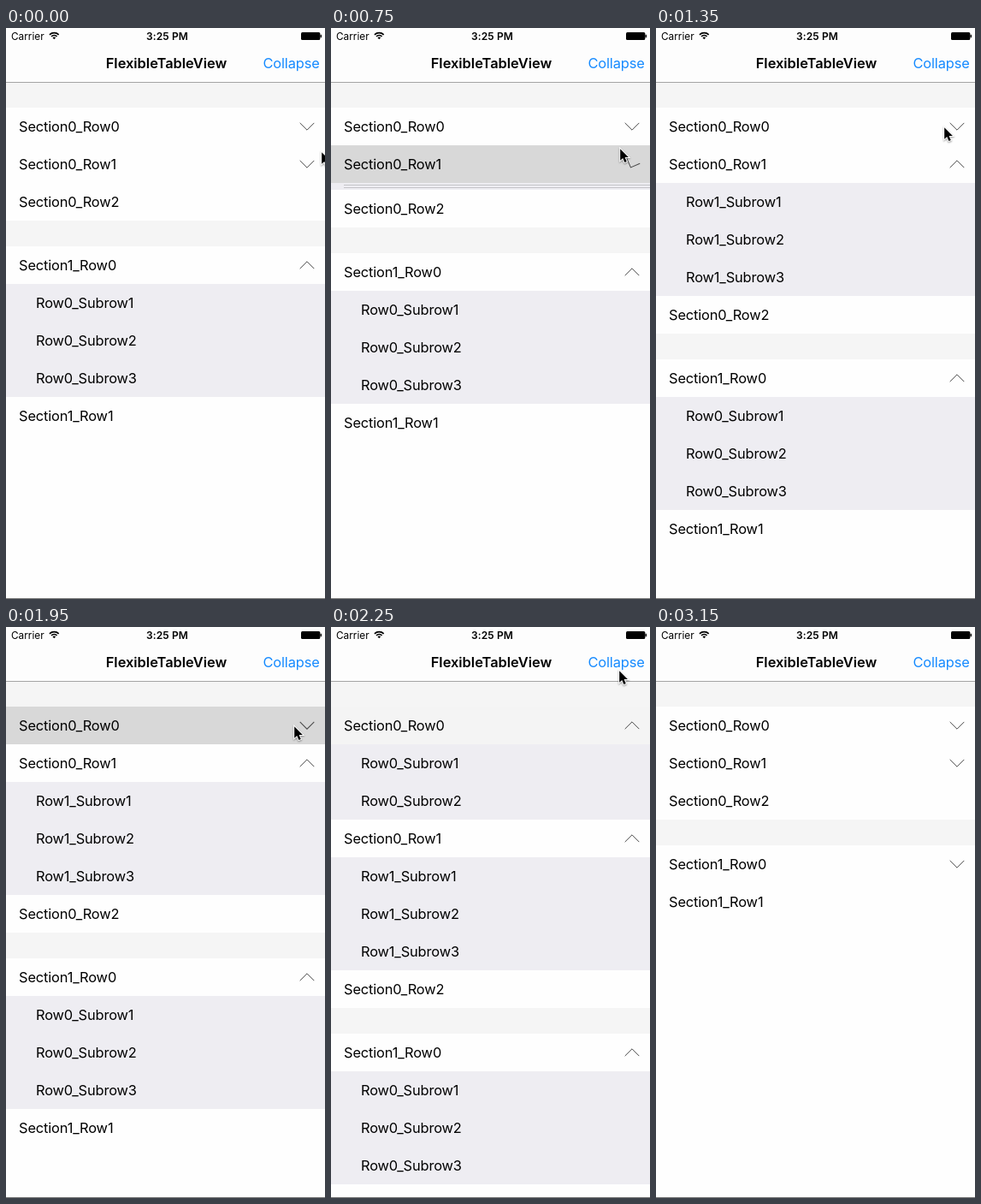
An HTML page with a canvas that plays this animation: 373x667 px, repeating every 4.5 s.

```html
<!DOCTYPE html>
<html lang="en">
<head>
<meta charset="utf-8">
<title>Expanding table</title>
<style>
  html, body { margin: 0; width: 100%; height: 100%; overflow: hidden; background: #fff; }
  canvas { display: block; width: 373px; height: 667px; }
</style>
</head>
<body>
<canvas id="stage"></canvas>
<script>
const W = 373, H = 667, ROW = 44, LOOP = 4500, TICK = 150;
const canvas = document.getElementById('stage');
const c = canvas.getContext('2d');
const dpr = window.devicePixelRatio || 1;
canvas.width = W * dpr;
canvas.height = H * dpr;

// openAt / turnAt: when the subrows and the chevron start to move (-1000 = already open)
const SECTIONS = [
  [
    { subs: 2, openAt: 1939, turnAt: 1945, tapAt: 1950 },
    { subs: 3, openAt: 714, turnAt: 705, tapAt: 750 },
    { subs: 0 }
  ],
  [
    { subs: 3, openAt: -1000, turnAt: -1000 },
    { subs: 0 }
  ]
];
const CLOSE_AT = 2741, TURN_BACK_AT = 2705, PRESS_AT = 2700;
const SLIDE = 231, TURN = 200;

// time, left, top
const POINTER = [
  [0, 368, 145], [150, 343, 143], [300, 337, 141], [900, 337, 139],
  [1050, 337, 135], [1200, 336, 120], [1350, 336, 116], [2100, 337, 110],
  [2250, 336, 51], [2400, 339, 42], [2550, 339, 41], [3000, 366, 41], [3150, W, 41]
];

const clamp = v => Math.max(0, Math.min(1, v));
const ease = p => (1 - Math.cos(Math.PI * clamp(p))) / 2;

function box(x, y, w, h, color) {
  c.fillStyle = color;
  c.fillRect(x, y, w, h);
}

function text(str, x, y, { size = 16.4, weight = 400, gap = -0.14, color = '#000', align = 'left' } = {}) {
  c.font = `${weight} ${size}px Inter, Roboto, sans-serif`;
  c.letterSpacing = gap + 'px';
  c.textAlign = align;
  c.fillStyle = color;
  c.fillText(str, x, y);
}

function polyline(points) {
  c.beginPath();
  points.forEach(([x, y]) => c.lineTo(x, y));
}

function chevron(y, turns) {
  c.save();
  c.translate(352, y);
  c.rotate(turns * Math.PI);
  polyline([[-8.3, -4.1], [0, 4.2], [8.3, -4.1]]);
  c.strokeStyle = '#484848';
  c.lineWidth = 1;
  c.stroke();
  c.restore();
}

// Each subrow slides out from under the one above it.
function subrows(row, index, y, height) {
  const h = height / row.subs;
  box(0, y, W, height, '#eeedf2');
  for (let i = 0; i < row.subs; i++) {
    const top = y + i * h;
    c.save();
    c.beginPath();
    c.rect(0, top, W, h);
    c.clip();
    text(`Row${index}_Subrow${i + 1}`, 35, top + h - 16);
    c.restore();
    if (i && h < 12) box(15, Math.floor(top), W - 15, 1, '#c4c4c8');
  }
}

function table(t) {
  let y = 63;
  SECTIONS.forEach((rows, s) => {
    box(0, y, W, 30, '#f5f5f5');
    y += 30;
    rows.forEach((row, r) => {
      const sinceTap = t - row.tapAt;
      const glow = sinceTap >= 0 ? clamp((350 - sinceTap) / 190) : 0;
      if (glow) box(0, y, W, ROW, `rgba(0,0,0,${0.15 * glow})`);
      text(`Section${s}_Row${r}`, 15, y + 28);
      if (row.subs) {
        chevron(y + 22, ease((t - row.turnAt) / TURN) + ease((t - TURN_BACK_AT) / TURN));
        const open = ease((t - row.openAt) / SLIDE) - ease((t - CLOSE_AT) / SLIDE);
        const height = Math.round(row.subs * ROW * open);
        if (height) subrows(row, r, y + ROW, height);
        y += height;
      }
      y += ROW;
    });
  });
}

function wifi(x, y) {
  c.strokeStyle = c.fillStyle = '#000';
  c.lineWidth = 1.7;
  for (const r of [4.6, 7.6]) {
    c.beginPath();
    c.arc(x, y, r, -Math.PI * 0.75, -Math.PI * 0.25);
    c.stroke();
  }
  c.beginPath();
  c.moveTo(x, y);
  c.arc(x, y, 2.6, -Math.PI * 0.75, -Math.PI * 0.25);
  c.fill();
}

function battery() {
  c.beginPath();
  c.roundRect(345, 5, 22.3, 9, 1.5);
  c.fillStyle = '#000';
  c.fill();
  box(367.3, 7.8, 1.9, 3.4, '#222');
}

function bars(t) {
  box(0, 0, W, 63, '#fdfdfd');
  box(0, 63, W, 1, '#a4a4a4');
  text('Carrier', 6, 14, { size: 11.8, gap: 0 });
  wifi(56.3, 13.2);
  text('3:25 PM', 188.5, 14, { size: 12, weight: 600, gap: 0.1, align: 'center' });
  battery();
  text('FlexibleTableView', 187.5, 47, { weight: 600, gap: 0, align: 'center' });
  c.globalAlpha = t < PRESS_AT ? 1 : clamp(0.2 + 0.8 * (t - PRESS_AT) / 350);
  text('Collapse', 300.5, 47, { color: '#158aff' });
  c.globalAlpha = 1;
}

function pointer(t) {
  const [, x, y] = POINTER.filter(([at]) => at <= t).pop();
  if (x >= W) return;
  c.save();
  c.translate(x + 1.2, y + 0.2);
  polyline([[0, 0], [0, 13.5], [3, 10.8], [5.2, 15.8], [7.6, 14.8], [5.4, 9.9], [9.7, 9.9]]);
  c.closePath();
  c.shadowColor = 'rgba(0,0,0,0.4)';
  c.shadowBlur = 2 * dpr;
  c.shadowOffsetY = dpr;
  c.strokeStyle = '#fff';
  c.lineWidth = 2;
  c.stroke();
  c.shadowColor = 'transparent';
  c.fillStyle = '#000';
  c.fill();
  c.restore();
}

const start = performance.now();

function draw() {
  // The screen refreshes in fixed ticks.
  const t = Math.floor((performance.now() - start) % LOOP / TICK) * TICK;
  c.setTransform(dpr, 0, 0, dpr, 0, 0);
  box(0, 0, W, H, '#fefefe');
  table(t);
  bars(t);
  box(0, H - 1, W, 1, '#777');
  pointer(t);
  requestAnimationFrame(draw);
}
draw();
</script>
</body>
</html>
```
